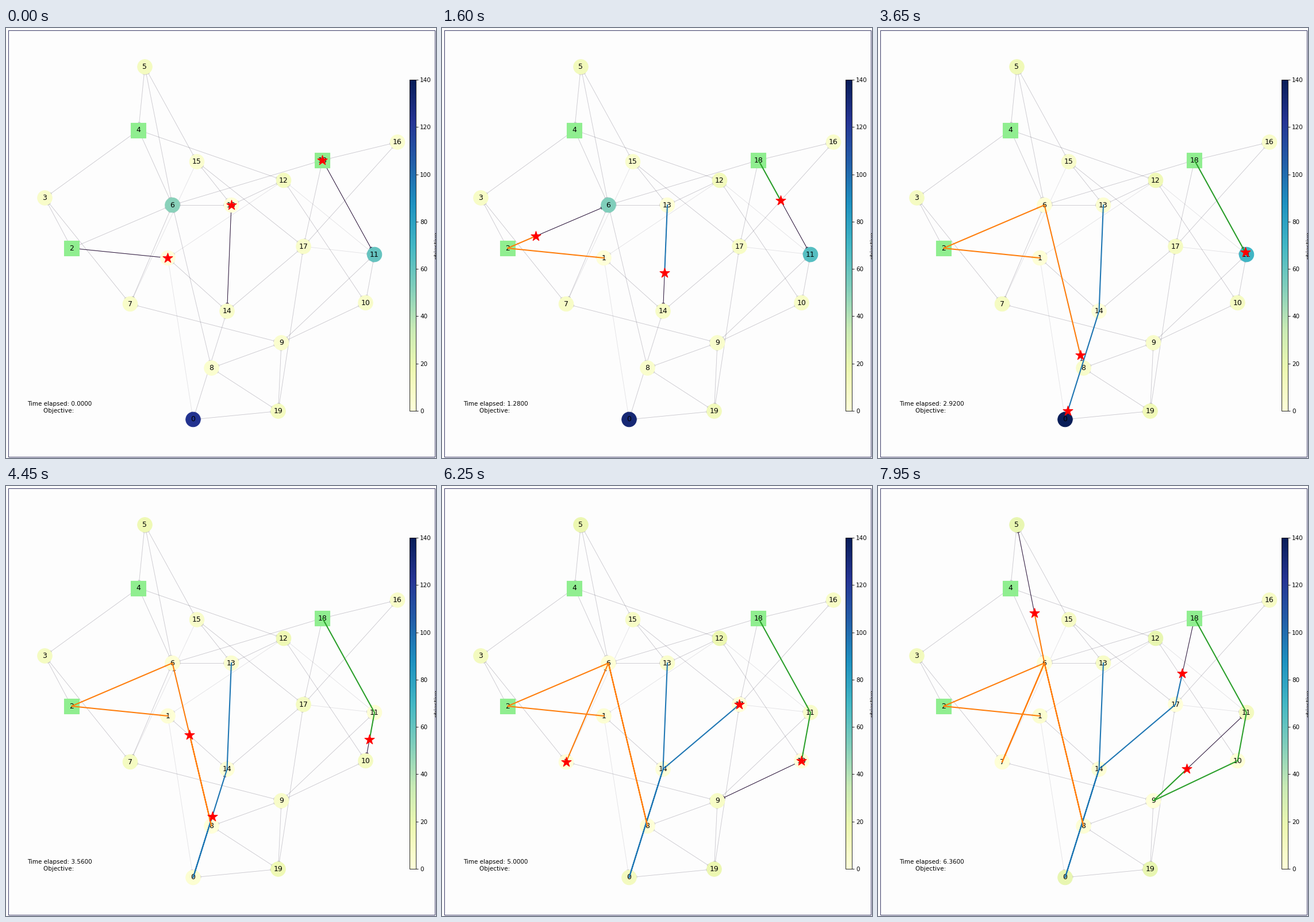
Animation, 748 px wide and 748 px high, one loop 8000 ms. Source, as a matplotlib script:

```python
from itertools import pairwise

import matplotlib.pyplot as plt
import numpy as np
from matplotlib.animation import FuncAnimation
from matplotlib.cm import ScalarMappable
from matplotlib.collections import LineCollection, PolyCollection
from matplotlib.colors import Normalize
from matplotlib.patches import Rectangle

SIZE, DPI = 748, 74.8
FRAMES, INTERVAL, STEP = 160, 50, 0.04
PT = DPI / 72

# Node positions in pixels, index = node label
POS = np.array([
    (325.5, 681), (281.5, 400), (114, 383), (67.5, 295.5), (230.5, 177.5),
    (241.5, 67.5), (289.5, 308), (216, 480), (357.5, 591.5), (479, 547.5),
    (625.5, 478), (641, 394), (483, 265), (392, 308), (384.5, 492.5),
    (332, 232.5), (681, 198.5), (517.5, 380), (550.5, 230), (473.5, 666.5)])
DEPOTS = [2, 4, 18]
ROUND = [n for n in range(len(POS)) if n not in DEPOTS]

# Edges as walks through the graph
TWO_WAY = [
    (5, 4, 3, 2, 1, 14, 0, 19, 17, 18, 16, 17, 14, 13, 12, 4, 6, 5, 15, 13, 6, 2),
    (3, 7, 9, 10, 11, 18, 6, 8, 19, 9, 11),
    (6, 7), (15, 17), (12, 10), (9, 8)]
ONE_WAY = [(17, 11, 12, 1, 0), (15, 7)]

# Colour, duration of the first leg, stops; all later legs take one time unit
# and a repeated stop is a wait
ROUTES = [
    ("#1f77b4", 2, (13, 14, 0, 14, 17, 17, 18)),
    ("#ff7f0e", 1, (1, 2, 6, 8, 6, 7, 6, 5)),
    ("#2ca02c", 3, (18, 11, 10, 10, 9, 11))]

# Node values grow steadily and drop to zero on a visit
RATE = 1 + 0.4 * np.cos(2 * np.pi * (np.arange(len(POS)) - 5) / 7)
START = 8 * RATE
for node, value, rate in [(0, 124, 6), (6, 50, 1.7), (11, 60, 3.5)]:
    START[node], RATE[node] = value, rate


def edges(walks):
    return [pair for walk in walks for pair in pairwise(walk)]


def arrow(u, v):
    """Shaft and head of an arrow that stops just inside node v."""
    a, b = POS[u], POS[v]
    d = (b - a) / np.hypot(*(b - a))
    tip = b - 9.5 * d
    base = tip - 4 * PT * d
    side = 2 * PT * np.array([-d[1], d[0]])
    return [a + 9 * d, tip], [tip, base + side, base - side]


def locate(first, stops, t):
    """Stops reached by time t, the next stop and the current point."""
    if t < first:
        k, part = 0, t / first
    else:
        k = 1 + int(t - first + 1e-9)
        part = t - first - (k - 1)
    u, v = stops[k:k + 2]
    return stops[:k + 1], v, POS[u] + (POS[v] - POS[u]) * part


def values(t):
    vals = START + RATE * t
    for _, first, stops in ROUTES:
        passed, nxt, _ = locate(first, stops, t)
        for k, n in enumerate(passed):
            reached = first + k - 1 if k else 0
            vals[n] = min(vals[n], RATE[n] * (t - reached))
        if passed[-1] == nxt:
            vals[nxt] = 0
    return vals


fig = plt.figure(figsize=(SIZE / DPI, SIZE / DPI), dpi=DPI, facecolor="#fdfdfd")
ax = fig.add_axes([0, 0, 1, 1])
ax.set(xlim=(0, SIZE), ylim=(SIZE, 0))
ax.axis("off")
ax.add_patch(Rectangle((4, 4), 742, 742, fill=False, ec="#16164a", lw=0.8))

norm = Normalize(0, 140)
cax = fig.add_axes([702 / SIZE, 1 - 666 / SIZE, 11 / SIZE, 576 / SIZE])
fig.colorbar(ScalarMappable(norm, "YlGnBu"), cax=cax, label="objective")

both = edges(TWO_WAY)
links = both + [(v, u) for u, v in both] + edges(ONE_WAY)
shafts, heads = zip(*(arrow(u, v) for u, v in links))
faint = dict(color="#1c1430", alpha=0.12, lw=0.8, zorder=1)
ax.add_collection(LineCollection(shafts, **faint))
ax.add_collection(PolyCollection(heads, **faint))

dark = dict(color="#240c34", lw=0.9, zorder=1.5)
legs = ax.add_collection(LineCollection([], **dark))
tips = ax.add_collection(PolyCollection([], **dark))

disks = ax.scatter(*POS[ROUND].T, s=600, c=np.zeros(len(ROUND)), cmap="YlGnBu",
                   norm=norm, zorder=2)
ax.scatter(*POS[DEPOTS].T, s=600, c="lightgreen", marker="s", zorder=2)
for n, (x, y) in enumerate(POS):
    ax.text(x, y, str(n), size=12, ha="center", va="center", zorder=3)

trails = [ax.plot([], [], color=c, lw=2, zorder=4)[0] for c, _, _ in ROUTES]
stars = ax.scatter([0] * 3, [0] * 3, s=300, c="red", marker="*", zorder=5)
caption = ax.text(93.5, 660, "", size=10, ha="center", va="center")


def update(i):
    t = i * STEP
    spots, active = [], []
    for (_, first, stops), trail in zip(ROUTES, trails):
        passed, nxt, spot = locate(first, stops, t)
        trail.set_data(*np.vstack([POS[list(passed)], spot]).T)
        spots.append(spot)
        if passed[-1] != nxt:
            active.append(arrow(passed[-1], nxt))
    legs.set_segments([shaft for shaft, _ in active])
    tips.set_verts([head for _, head in active])
    stars.set_offsets(spots)
    disks.set_array(values(t)[ROUND])
    caption.set_text(f"Time elapsed: {t:.4f}\nObjective: ")
    return [legs, tips, disks, *trails, stars, caption]


anim = FuncAnimation(fig, update, frames=FRAMES, interval=INTERVAL, repeat=True)
plt.show()
```
